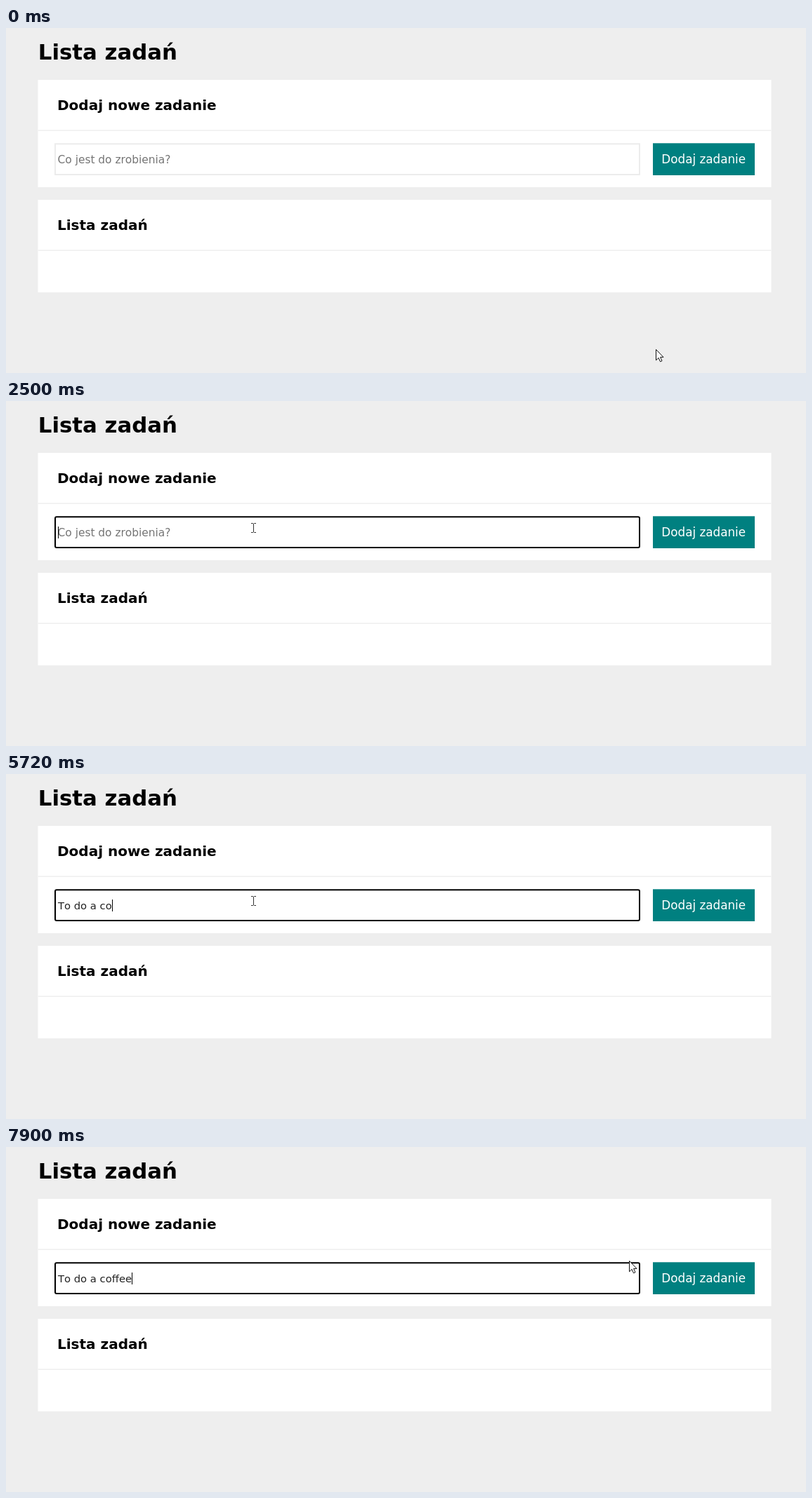
Recreate the animation shown at these times as an HTML page. Size 1139 by 492 pixels, loop 7.99 s.

```html
<!DOCTYPE html>
<html lang="pl">
<head>
<meta charset="utf-8">
<title>Lista zadań</title>
<style>
  html, body { margin: 0; width: 100%; height: 100%; overflow: hidden; background: #eee; }
  svg {
    display: block; width: 1139px; height: 492px;
    font-family: "DejaVu Sans", sans-serif;
    font-kerning: none; font-variant-ligatures: none;
  }
  .card { fill: #fff; }
  .rule { fill: #f0f0f0; }
  .title { font-weight: 700; font-size: 20px; }
  .big { font-size: 30.8px; }
  .hint { font-size: 15.4px; fill: #757575; }
  .typed { font-size: 14.75px; fill: #222; }
  .label { font-size: 16.8px; fill: #fff; }
  .field { fill: none; stroke: #ececec; stroke-width: 2; }
  .field.focus { stroke: #000; }
</style>
</head>
<body>
<svg viewBox="0 0 1139 492">
  <text class="title big" x="45.8" y="45">Lista zadań</text>

  <rect class="card" x="45.5" y="74" width="1044" height="153"/>
  <rect class="rule" x="45.5" y="145.3" width="1044" height="1.6"/>
  <text class="title" x="73" y="117">Dodaj nowe zadanie</text>
  <rect class="field" id="field" x="70" y="165.3" width="832" height="43.7"/>
  <text class="hint" id="hint" x="73.6" y="193">Co jest do zrobienia?</text>
  <text class="typed" id="typed" x="74" y="193"></text>
  <rect id="caret" y="179" width="1" height="17"/>
  <rect x="921" y="164.3" width="145" height="45.7" fill="#008080"/>
  <text class="label" x="933.3" y="193">Dodaj zadanie</text>

  <rect class="card" x="45.5" y="245" width="1044" height="132"/>
  <rect class="rule" x="45.5" y="316.3" width="1044" height="1.6"/>
  <text class="title" x="73" y="288">Lista zadań</text>

  <circle id="click" cx="340.8" cy="183.6" r="14.3" fill="#fffa7c"/>
  <g id="pointer">
    <path id="arrow" d="M0 .5V15.8L3.6 12.4 6 17.8 8.5 16.7 6.1 11.4H10.5Z" fill="#fff" stroke="#111"/>
    <path id="beam" d="M-3.5-6.5H-1L0-5.7 1-6.5H3.5M0-6V6M-3.5 6.5H-1L0 5.7 1 6.5H3.5" fill="none" stroke="#333"/>
  </g>
</svg>
<script>
const LOOP = 7990, CLICK = 1470, FOCUS = 1550, BLINK = 475;

const home = { x: 925, y: 458 };
// px and py ease each axis out; arc lifts the middle of the path
const moves = [
  { from: 70, to: 790, steps: 11, x: 347, y: 187, px: 2.77, py: 1.4 },
  { from: 870, to: 970, steps: 2, x: 343, y: 185 },
  { from: 1800, to: 1900, steps: 2, x: 352, y: 181 },
  { from: 7310, to: 7900, steps: 8, x: 887, y: 162, arc: 31 }
];

const bursts = [
  { text: 'To', at: 2800, every: 330 },
  { text: ' do a ', at: 3700, every: 220 },
  { text: 'coffee', at: 5400, every: 270 }
];
const keys = bursts.flatMap(b =>
  [...b.text].map((c, i) => ({ char: c === ' ' ? '\u00a0' : c, at: b.at + i * b.every })));

const $ = id => document.getElementById(id);
const show = (id, on) => $(id).setAttribute('visibility', on ? 'visible' : 'hidden');
const ease = (a, b, u, p = 1) => b - (b - a) * (1 - u) ** p;
const inField = ({ x, y }) => x > 69 && x < 903 && y > 164 && y < 210;

function pointerAt(t) {
  let p = home;
  for (const m of moves) {
    if (t < m.from) break;
    const part = Math.min(1, (t - m.from) / (m.to - m.from));
    const u = (Math.floor(part * (m.steps - 1)) + 1) / m.steps;
    p = {
      x: ease(p.x, m.x, u, m.px),
      y: ease(p.y, m.y, u, m.py) - (m.arc || 0) * Math.sin(Math.PI * u)
    };
  }
  return p;
}

function drawPointer(t) {
  const p = pointerAt(t), beam = inField(p);
  const [x, y] = [p.x, p.y].map(Math.round);
  $('pointer').setAttribute('transform', `translate(${x + .5} ${y})`);
  show('beam', beam);
  show('arrow', !beam);
  show('click', t >= CLICK && t < FOCUS);
}

function drawField(t) {
  const focused = t >= FOCUS;
  $('field').classList.toggle('focus', focused);
  $('field').setAttribute('rx', focused ? 2 : 0);

  const typed = keys.filter(k => k.at <= t);
  $('typed').textContent = typed.map(k => k.char).join('');
  show('hint', !typed.length);

  const since = t - (typed.length ? typed.at(-1).at : FOCUS);
  const width = typed.length ? $('typed').getComputedTextLength() : 0;
  $('caret').setAttribute('x', Math.round(74 + width));
  show('caret', focused && since % (2 * BLINK) < BLINK);
}

const start = performance.now();
function tick() {
  const t = (performance.now() - start) % LOOP;
  drawPointer(t);
  drawField(t);
  requestAnimationFrame(tick);
}
tick();
</script>
</body>
</html>
```
